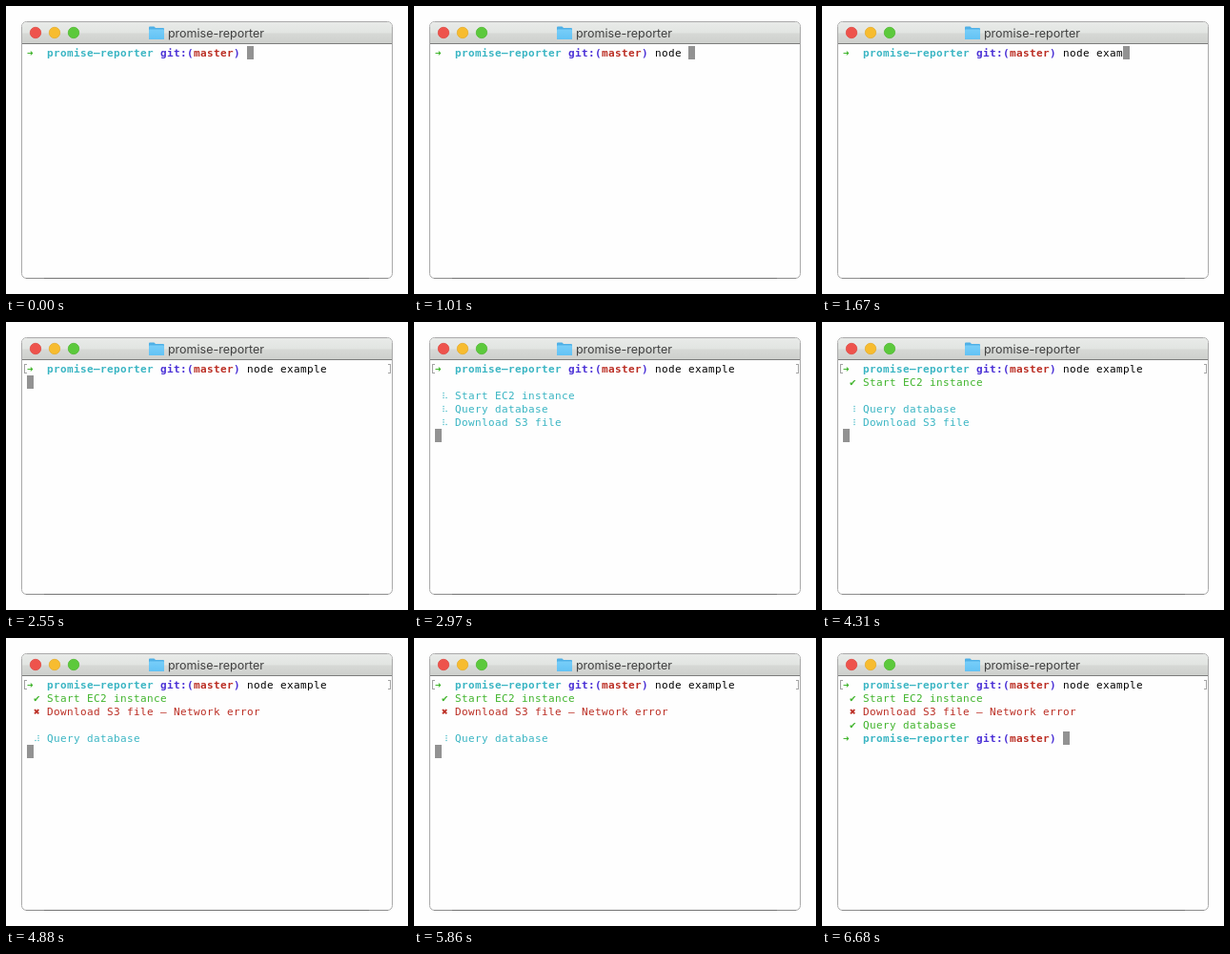
An HTML page for the animation above (8930 ms loop, 422 px wide and 302 px high).

```html
<!DOCTYPE html>
<html lang="en">
<head>
<meta charset="utf-8">
<title>promise-reporter</title>
<style>
  html, body { margin: 0; width: 100%; height: 100%; overflow: hidden; background: #fefefe; }
  svg { position: absolute; left: 0; top: 0; }
  .title { font: 12.5px Inter, sans-serif; fill: #414141; }
  #term {
    position: absolute; left: 22px; top: 42px;
    font: 11px/16px "DejaVu Sans Mono", monospace;
    letter-spacing: calc(7px - 1ch);
    color: #000;
  }
  #term span { position: absolute; white-space: pre; }
  .bold { font-weight: bold; }
  .green { color: #40b42c; }
  .cyan { color: #3ab5c3; }
  .blue { color: #4a30d6; }
  .red { color: #bb2d23; }
  #term .cursor { width: 7px; height: 14px; background: #929292; }
  #term .mark { width: 2px; height: 8px; margin-top: 2px; border: 1px solid #a3a3a3; }
  #term .open { margin-left: -3px; border-right: 0; }
  #term .close { margin-left: 1px; border-left: 0; }
  .dots { fill: none; stroke: #3ab5c3; stroke-width: 1.4; stroke-linecap: round; }
</style>
</head>
<body>
<svg width="422" height="302" viewBox="0 0 422 302">
  <defs>
    <linearGradient id="bar" x2="0" y2="1">
      <stop stop-color="#e8eae8"/>
      <stop offset=".5" stop-color="#e2e5e2"/>
      <stop offset=".54" stop-color="#d6d8d5"/>
      <stop offset="1" stop-color="#ced0cd"/>
    </linearGradient>
    <linearGradient id="folder" x2="0" y2="1">
      <stop stop-color="#78cef9"/>
      <stop offset="1" stop-color="#62c2f4"/>
    </linearGradient>
  </defs>
  <rect x="16.5" y="16.5" width="389" height="269" rx="5" fill="#fefefe" stroke="#a9a9a9"/>
  <path d="M17 39V21.5a4.5 4.5 0 0 1 4.5-4.5h379a4.5 4.5 0 0 1 4.5 4.5V39z" fill="url(#bar)"/>
  <path d="M17 39.5H405" stroke="#7c7c7c"/>
  <path d="M21 285.5H401" stroke="#8c8c8c"/>
  <path d="M40 285.5H381" stroke="#747474"/>
  <g stroke-width=".8">
    <circle cx="31" cy="28" r="5.7" fill="#ee534c" stroke="#e04a43"/>
    <circle cx="51" cy="28" r="5.7" fill="#f7bc2f" stroke="#e6ac2a"/>
    <circle cx="71" cy="28" r="5.7" fill="#5cc93c" stroke="#50b932"/>
  </g>
  <path d="M150 22.5q0-1 1-1h4.5l1.5 1.5h8q1 0 1 1V34q0 1-1 1H151q-1 0-1-1z" fill="#4fb0e6"/>
  <rect x="150" y="24.5" width="16" height="10.5" rx="1" fill="url(#folder)"/>
  <text class="title" x="220.5" y="33" text-anchor="middle">promise-reporter</text>
</svg>
<div id="term"></div>
<script>
  const LOOP = 8930, ENTER = 2550, BOOT = 2666, STARTED = 3188, FAILED = 4696, QUERIED = 6552, EXIT = 6680;
  const TICK = 58, SPIN = 52;
  const CELL = 7, LINE = 14;
  const COMMAND = 'node example';
  const KEYS = [540, 660, 780, 890, 1010, 1190, 1430, 1550, 1670, 1840, 1960, 2070];
  const SPINNER = '⠋⠙⠹⠸⠼⠴⠦⠧⠇⠏';
  const term = document.getElementById('term');

  const put = (row, col, cls, text = '') =>
    `<span class="${cls}" style="left:${col * CELL}px;top:${row * LINE}px">${text}</span>`;

  const cursor = (row, col) => put(row, col, 'cursor');

  const prompt = row =>
    put(row, 0, 'bold green', '➜') +
    put(row, 3, 'bold cyan', 'promise–reporter') +
    put(row, 20, 'bold blue', 'git:(') +
    put(row, 25, 'bold red', 'master') +
    put(row, 31, 'bold blue', ')');

  // Each braille character's low bits say which of its six dots are on.
  function spinner(row, t) {
    const step = Math.floor(Math.floor((t - ENTER) / TICK) * TICK / SPIN);
    const mask = SPINNER.charCodeAt(step % SPINNER.length) - 0x2800;
    let d = '';
    for (let i = 0; i < 6; i++) {
      if (mask >> i & 1) d += `M${i < 3 ? 2 : 5} ${4.5 + i % 3 * 2.5}h.01`;
    }
    return put(row, 1, 'dots', `<svg width="7" height="14"><path d="${d}"/></svg>`);
  }

  const pending = (row, text, t) => spinner(row, t) + put(row, 3, 'cyan', text);
  const passed = (row, text) => put(row, 1, 'green', '✔') + put(row, 3, 'green', text);
  const failed = (row, text) => put(row, 1, 'red', '✖') + put(row, 3, 'red', text);

  function report(t) {
    const start = 'Start EC2 instance', query = 'Query database', load = 'Download S3 file';
    if (t < STARTED) return pending(2, start, t) + pending(3, query, t) + pending(4, load, t);
    const done = passed(1, start);
    if (t < FAILED) return done + pending(3, query, t) + pending(4, load, t);
    const both = done + failed(2, load + ' – Network error');
    return both + (t < QUERIED ? pending(4, query, t) : passed(3, query));
  }

  function screen(t) {
    const typed = KEYS.filter(k => k <= t).length;
    let out = prompt(0) + put(0, 33, '', COMMAND.slice(0, typed));
    if (t < ENTER) return out + cursor(0, 33 + typed);
    out += put(0, 0, 'mark open') + put(0, 54, 'mark close');
    if (t < BOOT) return out + cursor(1, 0);
    out += report(t);
    if (t < QUERIED) return out + cursor(5, 0);
    if (t < EXIT) return out + cursor(4, 0);
    return out + prompt(4) + cursor(4, 33);
  }

  let shown;
  function draw() {
    const next = screen(performance.now() % LOOP);
    if (next !== shown) term.innerHTML = shown = next;
    requestAnimationFrame(draw);
  }
  draw();
</script>
</body>
</html>
```
